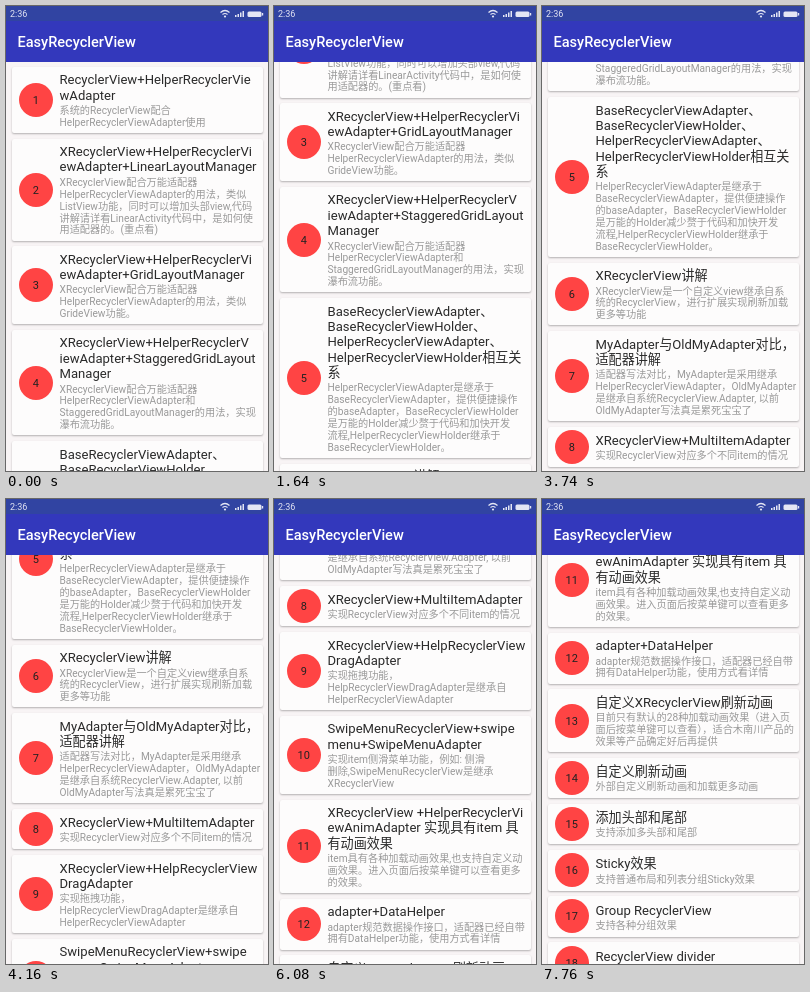
These frames come from a looping animation (262x465 px, 8 s). An HTML page:

```html
<!DOCTYPE html>
<html lang="zh-CN">
<head>
<meta charset="utf-8">
<style>
  html, body { margin: 0; width: 100%; height: 100%; overflow: hidden; background: #f8f4f5; }
  body { position: relative; font-family: Roboto, "Noto Sans CJK SC", "Noto Sans CJK", sans-serif; }
  header { position: absolute; inset: 0 0 auto; height: 56px; background: #3338bc; color: #fff; z-index: 1; }
  .status { height: 15px; background: #3144a2; color: #e4e6f4; font-size: 9px; line-height: 16px; padding-left: 4px; }
  .status svg { position: absolute; left: 212px; top: 2px; }
  h1 { margin: 0; padding-left: 11.5px; font: 500 14.56px/43px Roboto, sans-serif; }
  #list { position: absolute; left: 6px; top: 60.7px; width: 251px; }
  .card {
    box-sizing: border-box; position: relative; min-height: 40.5px; margin-bottom: 5.7px;
    padding: 5.5px 0 4.1px 47.5px; display: flex; flex-direction: column; justify-content: center;
    background: #fdfcfc; border-radius: 2px; box-shadow: 0 1px 2px rgba(0, 0, 0, .28); white-space: pre;
  }
  .num {
    position: absolute; left: 6.8px; top: 50%; width: 34px; height: 34px; margin-top: -17px;
    border-radius: 50%; background: #ff4444; color: #222; font-size: 11px; line-height: 35px; text-align: center;
  }
  .title { font-size: 13.1px; line-height: 15.35px; color: #2a2a2a; }
  .desc { margin-top: 2px; font-size: 10.19px; line-height: 11.94px; color: #999; }
</style>
</head>
<body>
<header>
  <div class="status">2:36
    <svg width="48" height="12" fill="#e4e6f4">
      <path d="M2.5 4.5Q7 .5 11.5 4.5M4.5 6.5Q7 4.5 9.5 6.5" fill="none" stroke="#e4e6f4" stroke-width="1.2"/>
      <circle cx="7" cy="8.5" r="1.1"/>
      <path d="M17 9V7H18.5V9ZM19.5 9V6H21V9ZM22 9V4.5H23.5V9ZM24.5 9V3H26V9Z"/>
      <rect x="29.5" y="3.5" width="14" height="5.5" rx="1.5"/>
      <rect x="44" y="5" width="1.2" height="2.5"/>
    </svg>
  </div>
  <h1>EasyRecyclerView</h1>
</header>
<main id="list"></main>
<script>
const items = [
  ['RecyclerView+HelperRecyclerVie\nwAdapter',
   '系统的RecyclerView配合\nHelperRecyclerViewAdapter使用'],
  ['XRecyclerView+HelperRecyclerVi\newAdapter+LinearLayoutManager',
   'XRecyclerView配合万能适配器\nHelperRecyclerViewAdapter的用法，类似\nListView功能，同时可以增加头部view,代码\n讲解请详看LinearActivity代码中，是如何使\n用适配器的。(重点看)'],
  ['XRecyclerView+HelperRecyclerVi\newAdapter+GridLayoutManager',
   'XRecyclerView配合万能适配器\nHelperRecyclerViewAdapter的用法，类似\nGrideView功能。'],
  ['XRecyclerView+HelperRecyclerV\niewAdapter+StaggeredGridLayout\nManager',
   'XRecyclerView配合万能适配器\nHelperRecyclerViewAdapter和\nStaggeredGridLayoutManager的用法，实现\n瀑布流功能。'],
  ['BaseRecyclerViewAdapter、\nBaseRecyclerViewHolder、\nHelperRecyclerViewAdapter、\nHelperRecyclerViewHolder相互关\n系',
   'HelperRecyclerViewAdapter是继承于\nBaseRecyclerViewAdapter，提供便捷操作\n的baseAdapter，BaseRecyclerViewHolder\n是万能的Holder减少赘于代码和加快开发\n流程,HelperRecyclerViewHolder继承于\nBaseRecyclerViewHolder。'],
  ['XRecyclerView讲解',
   'XRecyclerView是一个自定义view继承自系\n统的RecyclerView，进行扩展实现刷新加载\n更多等功能'],
  ['MyAdapter与OldMyAdapter对比，\n适配器讲解',
   '适配器写法对比，MyAdapter是采用继承\nHelperRecyclerViewAdapter，OldMyAdapter\n是继承自系统RecyclerView.Adapter, 以前\nOldMyAdapter写法真是累死宝宝了'],
  ['XRecyclerView+MultiItemAdapter', '实现RecyclerView对应多个不同item的情况'],
  ['XRecyclerView+HelpRecyclerView\nDragAdapter',
   '实现拖拽功能，\nHelpRecyclerViewDragAdapter是继承自\nHelperRecyclerViewAdapter'],
  ['SwipeMenuRecyclerView+swipe\nmenu+SwipeMenuAdapter',
   '实现item侧滑菜单功能，例如: 侧滑\n删除,SwipeMenuRecyclerView是继承\nXRecyclerView'],
  ['XRecyclerView +HelperRecyclerVi\newAnimAdapter 实现具有item 具\n有动画效果',
   'item具有各种加载动画效果,也支持自定义动\n画效果。进入页面后按菜单键可以查看更多\n的效果。'],
  ['adapter+DataHelper',
   'adapter规范数据操作接口，适配器已经自带\n拥有DataHelper功能，使用方式看详情'],
  ['自定义XRecyclerView刷新动画',
   '目前只有默认的28种加载动画效果（进入页\n面后按菜单键可以查看），适合木南川产品的\n效果等产品确定好后再提供'],
  ['自定义刷新动画', '外部自定义刷新动画和加载更多动画'],
  ['添加头部和尾部', '支持添加多头部和尾部'],
  ['Sticky效果', '支持普通布局和列表分组Sticky效果'],
  ['Group RecyclerView', '支持各种分组效果'],
  ['RecyclerView divider', '支持分割线']
];

// Each swipe: first step (ms), last step (ms), scroll position reached
const swipes = [
  [500, 800, 75], [1400, 2060, 178], [2240, 2540, 242], [2900, 3260, 310],
  [3740, 4160, 455], [4760, 5180, 585.5], [5720, 6080, 678], [6260, 6260, 680],
  [6560, 6860, 824.5], [7280, 7760, 944]
];
const LOOP = 8000, STEP = 60;
const list = document.getElementById('list');

function add(parent, cls, text = '') {
  const el = document.createElement('div');
  el.className = cls;
  el.textContent = text;
  return parent.appendChild(el);
}

items.forEach(([title, desc], i) => {
  const card = add(list, 'card');
  add(card, 'num', i + 1);
  add(card, 'title', title);
  add(card, 'desc', desc);
});

function scrollAt(time) {
  const t = Math.floor((time - 20) / STEP) * STEP + 20;
  let pos = 0;
  for (const [first, last, end] of swipes) {
    if (t < first) break;
    const p = Math.min(1, (t - first + STEP) / (last - first + STEP));
    pos += (end - pos) * (1 - (1 - p) ** 2);
  }
  return pos;
}

const start = performance.now();
function draw() {
  const time = (performance.now() - start) % LOOP;
  list.style.transform = `translateY(${-Math.round(scrollAt(time))}px)`;
  requestAnimationFrame(draw);
}
draw();
</script>
</body>
</html>
```
